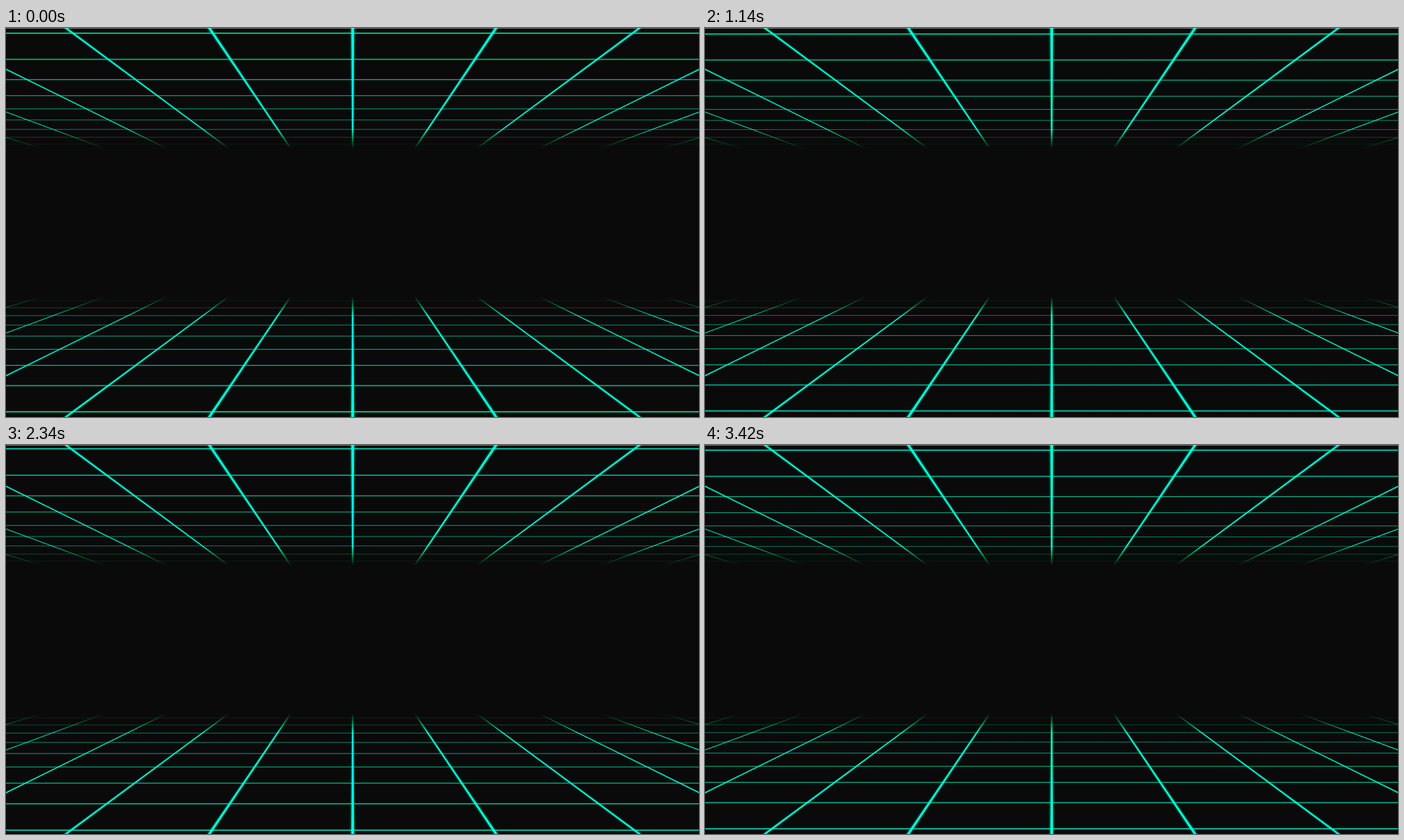
Animation of 998x561 px, one loop 3510 ms. Source, as an HTML page with a canvas:

```html
<!DOCTYPE html>
<html lang="en">
<head>
<meta charset="utf-8">
<title>Neon grid</title>
<style>
  html, body { margin: 0; width: 100%; height: 100%; overflow: hidden; background: #0a0a0a; }
  canvas { display: block; }
</style>
</head>
<body>
<canvas id="stage" width="998" height="561"></canvas>
<script>
const W = 998, H = 561;
const ctx = document.getElementById('stage').getContext('2d');

const LOOP = 3510, STEP = 30, FIRST_MOVE = 60, LAST_MOVE = 3420;
const PHASE_PER_STEP = 0.05187;

// Ceiling plane: a point at depth u appears 1/u pixels above the horizon.
const CENTER_X = 499.3, HORIZON = 306, FAR_Y = 174;
const DEPTH_START = 0.00335, DEPTH_STEP = 0.000484;
const DEPTH_FAR = 1 / (HORIZON - FAR_Y);
const COLUMN_SLOPE = 0.675;

function fade(stops) {
  const gradient = ctx.createLinearGradient(0, FAR_Y, 0, 146);
  stops.forEach(([at, color]) => gradient.addColorStop(at, color));
  return gradient;
}

const core = fade([
  [0, 'rgba(0,190,110,0)'],
  [0.55, 'rgba(0,225,145,0.6)'],
  [1, 'rgb(0,255,230)']
]);
const glow = alpha => fade([
  [0, 'rgba(0,255,130,0)'],
  [1, `rgba(0,255,130,${alpha})`]
]);

// Widths are given at the near edge and shrink with distance.
const columnLayers = [[10, glow(0.09)], [7, glow(0.17)], [4, core]];
const rowLayers = [[0.00004, glow(0.2)], [0.000011, core]];

function drawColumn(index, width, fill) {
  const near = HORIZON, far = HORIZON - FAR_Y;
  const slope = index * COLUMN_SLOPE;
  const half = width / 2 / HORIZON;
  const x = (distance, side) => CENTER_X + distance * (slope + side * half);
  ctx.fillStyle = fill;
  ctx.beginPath();
  ctx.moveTo(x(near, -1), 0);
  ctx.lineTo(x(near, 1), 0);
  ctx.lineTo(x(far, 1), FAR_Y);
  ctx.lineTo(x(far, -1), FAR_Y);
  ctx.fill();
}

function drawRow(depth, thickness, fill) {
  const distance = 1 / depth;
  const height = thickness * distance * distance;
  ctx.fillStyle = fill;
  ctx.fillRect(0, HORIZON - distance - height / 2, W, height);
}

function drawPlane(phase) {
  for (const [thickness, fill] of rowLayers) {
    for (let k = phase - 1; ; k++) {
      const depth = DEPTH_START + DEPTH_STEP * k;
      if (depth > DEPTH_FAR) break;
      drawRow(depth, thickness, fill);
    }
  }
  for (const [width, fill] of columnLayers) {
    for (let i = -5; i <= 5; i++) drawColumn(i, width, fill);
  }
}

function phaseAt(time) {
  if (time < FIRST_MOVE || time >= LAST_MOVE) return 0;
  const travel = Math.floor(time / STEP) * PHASE_PER_STEP;
  return (Math.ceil(travel) - travel) % 1;
}

function render(now) {
  const phase = phaseAt(now % LOOP);
  ctx.fillStyle = '#0a0a0a';
  ctx.fillRect(0, 0, W, H);

  drawPlane(phase);
  ctx.save();
  ctx.translate(0, H);
  ctx.scale(1, -1);
  drawPlane(phase);
  ctx.restore();

  // Pale hairline along the top edge.
  ctx.fillStyle = 'rgba(255,255,255,0.4)';
  ctx.fillRect(0, 0, W, 1);
}

const start = performance.now();
function tick() {
  render(performance.now() - start);
  requestAnimationFrame(tick);
}
tick();
</script>
</body>
</html>
```
